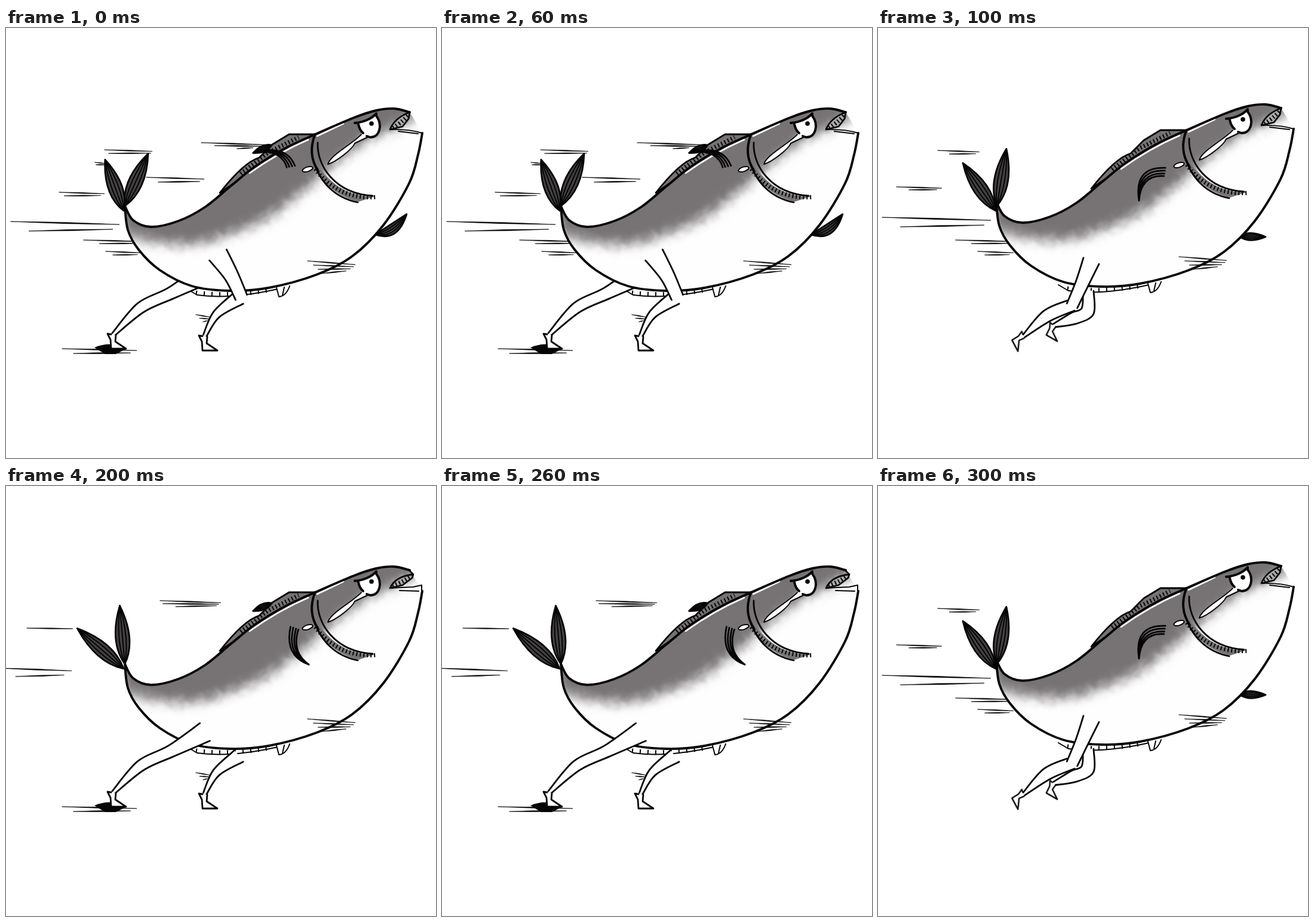
Animation of 720 by 720 pixels, one loop 0.4 s. Source, as an HTML page:

```html
<!DOCTYPE html>
<html lang="en">
<head>
<meta charset="utf-8">
<title>Running fish</title>
<style>
  html, body { margin: 0; width: 100%; height: 100%; overflow: hidden; background: #fff; }
  svg { display: block; width: 100vw; height: 100vh; }
  path, ellipse { stroke-linecap: round; stroke-linejoin: round; }
  .ink { fill: none; stroke: #050505; stroke-width: 2.8; }
  .bold { stroke-width: 3.9; }
  .thin { stroke-width: 2; }
  .bare { fill: #fff; }
  .white { fill: #fff; }
  .grey { fill: #777374; }
  .dark { fill: #444142; }
  .black { fill: #050505; }
  .hatch { stroke-width: 7; stroke-linecap: butt; stroke-dasharray: 2 4; }
</style>
</head>
<body>
<svg viewBox="0 0 720 720">
  <defs>
    <path id="hull"/>
    <clipPath id="inside"><use href="#hull"/></clipPath>
    <filter id="wash" x="-10%" y="-10%" width="120%" height="120%" color-interpolation-filters="sRGB">
      <feGaussianBlur stdDeviation="10" result="soft"/>
      <feTurbulence type="fractalNoise" baseFrequency=".06" numOctaves="2" seed="4"/>
      <feDisplacementMap in="soft" scale="12" xChannelSelector="R" yChannelSelector="G"/>
    </filter>
  </defs>

  <g id="wind"></g>

  <g id="under" class="bob">
    <path class="ink thin white" d="M303 437L320 447Q375 455 455 437"/>
    <path class="ink hatch" style="stroke-dasharray:2 11" d="M318 443Q380 450 440 439"/>
    <path class="ink thin white" d="M453 435L457 450Q469 449 475 432M463 447L466 434"/>
  </g>

  <g id="far"></g>

  <g id="fish" class="bob">
    <!-- dorsal fin -->
    <path class="ink grey" d="M358 276Q398 225 424 217L446 195L474 178H518L417 236Z"/>
    <path class="ink hatch" d="M393 244L440 208L490 183"/>

    <use href="#hull" fill="#fefefe"/>
    <g clip-path="url(#inside)">
      <path id="shade" class="grey" filter="url(#wash)"/>
      <path fill="none" stroke="#fff" stroke-width="2.5" d="M408 243Q455 209 506 187M521 181L565 160"/>
    </g>
    <path id="back" class="ink bold"/>
    <path id="belly" class="ink bold"/>

    <!-- gill -->
    <path class="grey" d="M516 182C503 225 530 275 590 291L618 282C575 283 546 263 523 232Z"/>
    <path class="ink hatch" d="M518 236C540 267 575 287 622 283"/>
    <path class="ink bold" d="M517 179Q505 212 522 238"/>
    <path class="ink" d="M514 220C525 258 550 284 589 292M522 192C520 230 550 277 614 281"/>

    <!-- eye and tears -->
    <path class="ink thin white" d="M598 175C586 191 543 212 539 228C553 224 580 203 584 193L607 182"/>
    <path class="bare" d="M590 160Q608 157 620 147C631 162 624 183 610 183L597 182Z"/>
    <path class="ink bold" d="M584 159Q607 157 620 143V147C631 162 626 183 610 183L604 181M590 161Q592 171 598 176"/>
    <circle class="black" cx="612" cy="160" r="3.8"/>
    <ellipse class="ink thin white" cx="505" cy="236.500" rx="9" ry="3.800" transform="rotate(-18 505 236.500)"/>

    <!-- mouth -->
    <g data-pose="ab">
      <path class="ink" style="fill:#aaa" d="M676 141L674 152L664 165L643 170Q650 151 676 141Z"/>
      <path class="ink hatch" d="M648 167Q660 160 673 147"/>
      <path class="ink thin" d="M643 170Q675 169 697 176M657 173L690 177"/>
    </g>
    <g data-pose="c">
      <path class="ink" style="fill:#aaa" d="M674 140L682 148L680 154L664 166L643 171Q652 151 682 148"/>
      <path class="ink hatch" d="M647 167Q662 162 678 151"/>
      <path class="bare" d="M650 172L695 166L696 176Z"/>
      <path class="ink thin" d="M643 171L682 169L696 166V178M659 175L691 176"/>
    </g>
  </g>

  <g id="tail"></g>
  <g id="near"></g>
</svg>
<script>
  const LOOP = 400;
  const order = [...'abcb'];
  const $ = id => document.getElementById(id);

  let seed = 7;
  const random = () => (seed = seed * 16807 % 2147483647) / 2147483647;
  const mix = (p, q, k) => p.map((v, i) => v + (q[i] - v) * k);

  function draw(layer, d, cls, pose) {
    const path = document.createElementNS('http://www.w3.org/2000/svg', 'path');
    path.setAttribute('d', d);
    path.setAttribute('class', cls);
    if (pose) path.dataset.pose = pose;
    $(layer).append(path);
  }

  // Smooth curve through a few key points.
  function spline(points) {
    const at = i => points[Math.max(0, Math.min(points.length - 1, i))];
    const handle = (i, side) => at(i).map((v, n) => v + side * (at(i + 1)[n] - at(i - 1)[n]) / 6);
    return points.reduce((d, p, i) => i ? `${d}C${handle(i - 1, 1)} ${handle(i, -1)} ${p}` : `M${p}`, '');
  }
  const enclose = (one, other) => spline(one) + spline([...other].reverse()).replace('M', 'L') + 'Z';
  const parse = text => text.split(' ').map(pair => pair.split(',').map(Number));

  // Body
  const back = parse('199,298 213,322 243,333 289,323 333,300 377,264 417,232 470,200 520,177 583,150 620,138 650,135 676,141');
  const belly = parse('199,298 204,338 222,371 257,405 311,432 375,440 440,435 520,413 580,382 632,330 675,260 690,212 697,176');
  const shadeEdge = parse('195,343 235,357 300,362 345,356 430,322 480,288 550,229 602,190 645,170');
  $('back').setAttribute('d', spline(back));
  $('belly').setAttribute('d', spline(belly));
  $('hull').setAttribute('d', enclose(back, belly));
  $('shade').setAttribute('d', spline(shadeEdge) + 'L720 130L600 60L180 250Z');

  // Rows of tapered strokes that converge slightly downwind.
  function gust(pose, x, y, length, rows = 2, gap = 6, layer = 'wind') {
    for (let i = 0; i < rows; i++) {
      const x1 = x + length * .3 * i * random(), x2 = x + length * (1 - .12 * i * random());
      const y1 = y + gap * i, y2 = y1 + gap * (rows - 1 - 2 * i) / 4 + 1;
      const weight = 1.2 + length / 200, mid = (y1 + y2) / 2;
      draw(layer, `M${x1} ${y1}Q${(x1 + x2) / 2} ${mid - weight} ${x2} ${y2}Q${(x1 + x2) / 2} ${mid + weight} ${x1} ${y1}Z`, 'ink black', pose);
      $(layer).lastChild.style.strokeWidth = .7;
    }
  }
  gust('a', 165, 204, 80);
  gust('a', 149, 225, 18, 2, 4);
  gust('a', 235, 250, 97, 2, 8);
  gust('a', 89, 275, 76);
  gust('a', 327, 192, 108, 3, 5);
  gust('b', 100, 205, 70);
  gust('b', 31, 266, 76, 2, 5);
  gust('c', 35, 238, 77, 1);
  gust('c', 258, 192, 102, 3, 5);
  gust('c', -10, 305, 120, 2, 14);
  gust('ab', 8, 324, 182, 2, 16, 'under');
  gust('ab', 130, 355, 97);
  gust('ab', 167, 374, 60);
  gust('', 505, 390, 80, 4, 7, 'fish');
  gust('ac', 318, 480, 23, 3);
  gust('ac', 94, 537, 125, 2, 8);
  draw('far', 'M148 535Q176 523 202 537L184 546H166Z', 'black', 'ac');

  // Limb with a width at each joint; only its sides are inked.
  function limb(layer, pose, joints, widths) {
    const side = sign => joints.map(([x, y], i) => {
      const [x0, y0] = joints[Math.max(0, i - 1)], [x1, y1] = joints[Math.min(joints.length - 1, i + 1)];
      const reach = sign * widths[i] / 2 / Math.hypot(x1 - x0, y1 - y0);
      return [x - (y1 - y0) * reach, y + (x1 - x0) * reach];
    });
    const left = side(1), right = side(-1);
    draw(layer, enclose(left, right), 'bare', pose);
    draw(layer, spline(left) + spline(right), 'ink', pose);
  }

  function foot(layer, pose, [x, y], turn = 0, size = 1) {
    draw(layer, 'M-4 0L-10 -1L-5 9L-4 24H21L3 12L4 1', 'ink white', pose);
    $(layer).lastChild.setAttribute('transform', `translate(${x} ${y}) rotate(${turn}) scale(${size})`);
  }

  // The hind leg swings from behind the body to in front of it.
  for (const [layer, pose] of [['far', 'a'], ['near', 'c']]) {
    limb(layer, pose, [[333, 412], [276, 444], [226, 468], [180, 513]], [34, 20, 18, 6]);
    foot(layer, pose, [180, 513]);
  }
  limb('far', 'ac', [[390, 452], [352, 480], [333, 515]], [24, 13, 6]);
  foot('far', 'ac', [333, 516]);
  limb('near', 'a', [[355, 380], [378, 416], [394, 451]], [34, 24, 21]);

  limb('far', 'b', [[352, 440], [351, 474], [328, 486], [295, 498]], [18, 22, 20, 6]);
  foot('far', 'b', [295, 498], 30, .85);
  limb('near', 'b', [[325, 464], [283, 482], [244, 516]], [20, 20, 5]);
  foot('near', 'b', [244, 516], 62, .85);
  limb('near', 'b', [[357, 390], [342, 427], [325, 465]], [28, 22, 19]);

  // Leaf-shaped fin: ribs fan from base to tip; angle is measured from upright.
  function lobe(layer, pose, base, angle, length, width, bend = 0) {
    const sin = Math.sin(angle * Math.PI / 180), cos = Math.cos(angle * Math.PI / 180);
    const place = (along, across) => [base[0] + along * sin + across * cos, base[1] - along * cos + across * sin];
    const tip = place(length, 0), rib = k => place(length * .4, bend + k * width);
    draw(layer, `M${base}Q${rib(-1)} ${tip}Q${rib(1)} ${base}Z`, 'ink dark', pose);
    draw(layer, [-.5, 0, .5].map(k => `M${base}Q${rib(k)} ${tip}`).join(''), 'ink thin', pose);
  }
  [...'abc'].forEach((pose, sway) => {
    lobe('tail', pose, [197, 306], -20 - 14.5 * sway, 91 + 6 * sway, 23);
    lobe('tail', pose, [199, 298], 24 - 14.5 * sway, 96 + sway, 23);
  });
  lobe('far', 'a', [618, 346], 57, 63, 16, 16);
  lobe('far', 'b', [605, 349], 91, 44, 12);
  lobe('near', 'ac', [445, 196], -113, 34, 10);

  // Side fin: strands start side by side, curve round a bend and meet at the tip.
  function sideFin(pose, root, bend, tip) {
    const [dx, dy] = [bend[0] - root[0], bend[1] - root[1]], size = Math.hypot(dx, dy);
    const strands = [-1, -.3, .4, 1].map(k => {
      const start = [root[0] + 7 * k * dy / size, root[1] - 7 * k * dx / size];
      return `M${start}Q${mix(bend, mix(root, tip, .5), .2 * (k + 1))} ${tip}`;
    });
    draw('near', strands.join(''), 'ink', pose);
  }
  sideFin('a', [477, 232], [470, 196], [422, 207]);
  sideFin('b', [480, 241], [428, 232], [437, 289]);
  sideFin('c', [483, 238], [466, 284], [507, 299]);

  // Hold one value per pose, then jump to the next.
  function hold(el, prop, valueOf) {
    const frames = [...order, order[0]].map((pose, i) => ({
      offset: i / order.length, [prop]: valueOf(pose), easing: 'steps(1, end)'
    }));
    el.animate(frames, { duration: LOOP, iterations: Infinity }).startTime = document.timeline.currentTime;
  }
  for (const el of document.querySelectorAll('[data-pose]'))
    hold(el, 'opacity', pose => el.dataset.pose.includes(pose) ? 1 : 0);
  for (const el of document.querySelectorAll('.bob'))
    hold(el, 'transform', pose => pose === 'b' ? 'translate(-1px, -7px)' : 'translate(0px, 0px)');
</script>
</body>
</html>
```
